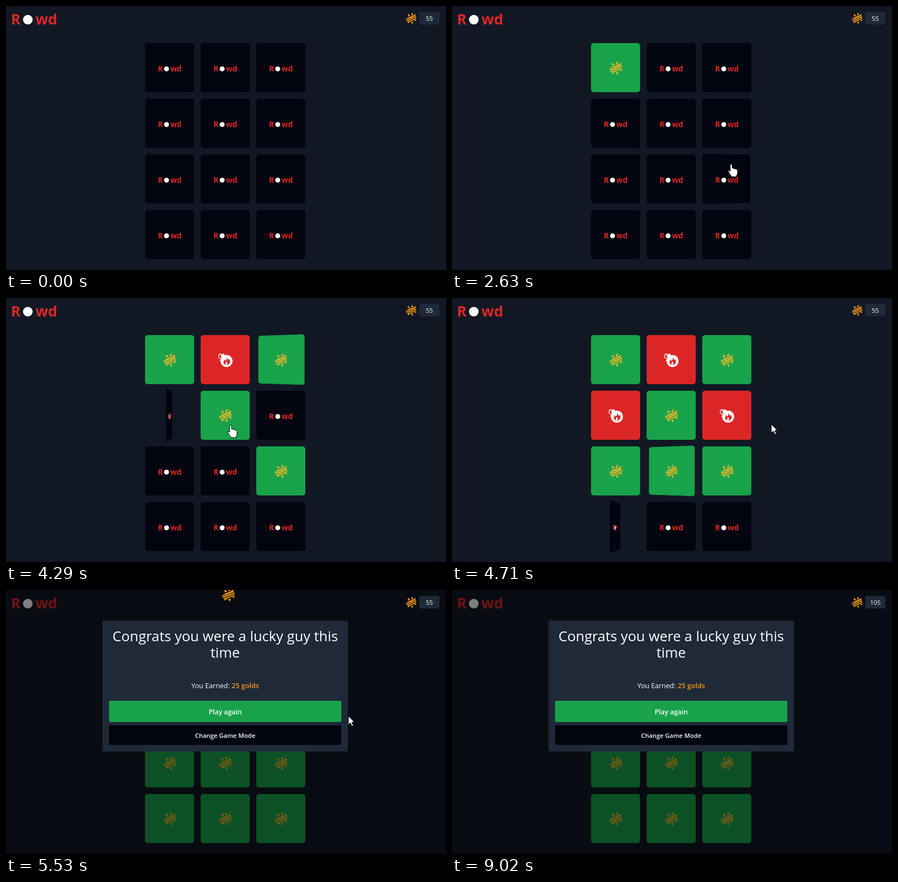
These frames come from a looping animation (807 px wide and 484 px high, 9.42 s). An HTML page:

```html
<!DOCTYPE html>
<html lang="en">
<head>
<meta charset="utf-8">
<title>Card game</title>
<style>
  html, body { margin: 0; width: 100%; height: 100%; overflow: hidden; background: #111824; }
  body { position: relative; font-family: "Open Sans", "Noto Sans", sans-serif; }
  svg { display: block; }
  .layer { position: absolute; left: 0; top: 0; width: 807px; height: 484px; }
  .slot { position: absolute; width: 90px; height: 90px; perspective: 500px; }
  .card { width: 100%; height: 100%; transform-style: preserve-3d; }
  .face { position: absolute; inset: 0; border-radius: 5px; overflow: hidden; backface-visibility: hidden; }
  .front { background: #02050f; }
  .back { transform: rotateY(180deg); color: #ebb62c; }
  .back.gold { background: #18a34a; }
  .back.blast { background: #dc2626; }
  .logo { font-weight: 700; font-size: 27px; fill: #dc2626; }
  .mid { text-anchor: middle; fill: #fff; }
</style>
</head>
<body>
<svg class="layer" viewBox="0 0 807 484">
  <defs>
    <g id="logo" class="logo">
      <text x="9" y="34">R</text>
      <circle cx="40" cy="25" r="8.8" fill="#fff"/>
      <text x="54" y="34">wd</text>
    </g>
    <g id="gold" fill="currentColor">
      <path d="M-7-10L-2-6L-7-4ZM3-13L4-7.5L-1-6ZM9.5-10L9.5-5L6-7ZM12.5 5L8 2.5L7.5 6ZM3 13L-.5 8.5L4.5 7ZM-7 11L-7.5 6.5L-3 8.5Z"/>
      <path d="M-9-.8L7-7.2L10-5.2L-5.5 1Z"/>
      <path d="M-12 2.2L-10 .2L-5.6 2.3L10.6-4.2L11.6-2L-5 4.8Z"/>
      <path d="M-11.5 3.8L-5 6.3L12-.6L11.5 1.6L-4.6 8.4L-10.5 5.8Z"/>
    </g>
    <g id="blast">
      <circle cx="2" cy="2" r="11" fill="#fff"/>
      <path d="M-9-8L-4-12L0-8L-6-2Z" fill="#fff"/>
      <path d="M-7-9Q-10-13-12-9T-10-3T-10 2" fill="none" stroke="#fff" stroke-width="1.3"/>
      <path d="M3-6Q3-2 6 1L7-2Q10 3 7 7Q5 10 1 9.5Q-4 8-3.5 3L-2-1L0 2Q3-1 3-6Z" fill="#dc2626"/>
      <path d="M2 3Q5 6 3 9H0Q-1 6 2 3Z" fill="#fff"/>
    </g>
  </defs>
  <use href="#logo"/>
</svg>
<div id="board"></div>
<svg class="layer" viewBox="0 0 807 484">
  <g id="modal">
    <rect width="807" height="484" fill="#000" opacity=".5"/>
    <rect x="177" y="56" width="450" height="240" rx="3" fill="#1f2937"/>
    <g class="mid" font-size="25.8">
      <text x="402" y="94">Congrats you were a lucky guy this</text>
      <text x="402" y="123.5">time</text>
    </g>
    <text class="mid" x="402" y="179.5" font-size="12.7">You Earned: <tspan font-weight="600" fill="#f0981b">25 golds</tspan></text>
    <rect x="189" y="203" width="426" height="39" rx="3" fill="#18a34a"/>
    <rect x="189" y="248" width="426" height="36" rx="3" fill="#02050f"/>
    <g class="mid" font-weight="600">
      <text x="402" y="227.5" font-size="12.4">Play again</text>
      <text x="402" y="270.5" font-size="11.4">Change Game Mode</text>
    </g>
  </g>
  <g color="#f59a18">
    <use href="#gold" transform="translate(743 22.5) scale(.83)"/>
    <use id="coin" href="#gold"/>
  </g>
  <rect x="758" y="11" width="37" height="23" rx="3" fill="#1f2937"/>
  <text id="score" class="mid" x="776.5" y="26.7" font-size="11.5" font-weight="500">55</text>
  <g id="cursor" fill="#fff" stroke="#000" stroke-width="1" stroke-linejoin="round">
    <path id="arrow" d="M0 0V16L3.8 12.6L6.4 18.8L9 17.7L6.4 11.6H11Z"/>
    <path id="hand" d="M-1.8 1.8Q-1.5 0 0 0T1.8 1.8V7.2Q4.4 6.4 5 8.4Q7.5 7.4 8.3 9.3Q11.6 8.6 11.8 11.5V16Q11.6 19 10 20.5V23H0V21Q-2 19.5-3 17L-5.2 13.3Q-5.6 10.6-3.4 11.4L-1.8 13.2Z"/>
  </g>
</svg>
<script>
const LOOP = 9420, FLIP = 315;
const LOSING = [1, 3, 5];
const PICKS = { 0: 1400, 8: 2605, 4: 3440 };
const REVEAL = 3993, STAGGER = 106;
const WIN = 5500, LAND = 6500;
const $ = id => document.getElementById(id);

// Cursor tip: time, x, y
const TRACK = [
  [70, 752, 472], [200, 742, 425], [340, 716, 362], [480, 672, 305], [620, 590, 266],
  [760, 500, 232], [970, 394, 179], [1040, 386, 173], [1330, 312, 118], [1640, 312, 118],
  [1930, 368, 168], [2200, 450, 240], [2500, 512, 290], [2930, 512, 290], [3260, 412, 233],
  [4360, 412, 233], [4850, 628, 231], [6150, 628, 231], [6500, 655, 240], [6800, 725, 257],
  [7080, 790, 274]
];

const clamp = v => Math.max(0, Math.min(1, v));

// cubic-bezier(.25, .1, .25, 1)
function ease(x) {
  if (x <= 0 || x >= 1) return clamp(x);
  const curve = (u, a, b) => 3 * a * u * (1 - u) ** 2 + 3 * b * u * u * (1 - u) + u ** 3;
  let lo = 0, hi = 1;
  for (let i = 0; i < 24; i++) {
    const m = (lo + hi) / 2;
    if (curve(m, .25, .25) < x) lo = m; else hi = m;
  }
  return curve(lo, .1, 1);
}

const same = (a, b) => a[1] === b[1] && a[2] === b[2];

function slope(i, k) {
  const p = TRACK[i - 1], c = TRACK[i], n = TRACK[i + 1];
  if (!p || !n || same(p, c) || same(c, n)) return 0;
  return (n[k] - p[k]) / (n[0] - p[0]);
}

function cursorAt(t) {
  const i = TRACK.findIndex(p => p[0] > t) - 1;
  if (i < 0) return null;
  const a = TRACK[i], b = TRACK[i + 1], d = b[0] - a[0], u = (t - a[0]) / d;
  return [1, 2].map(k =>
    a[k] * (1 + 2 * u) * (1 - u) ** 2 + b[k] * u * u * (3 - 2 * u) +
    d * u * (1 - u) * (slope(i, k) * (1 - u) - slope(i + 1, k) * u));
}

let order = 0;
const cards = Array.from({ length: 12 }, (_, i) => {
  const x = 255 + 102 * (i % 3), y = 68 + 102 * Math.floor(i / 3);
  const kind = LOSING.includes(i) ? 'blast' : 'gold';
  const start = PICKS[i] ?? REVEAL + STAGGER * order++;
  const slot = document.createElement('div');
  slot.className = 'slot';
  slot.style.cssText = `left:${x}px;top:${y}px`;
  slot.innerHTML = `<div class="card">
    <div class="face front"><svg width="90" height="90"><use href="#logo" transform="translate(19 34.5) scale(.51)"/></svg></div>
    <div class="face back ${kind}"><svg width="90" height="90"><use href="#${kind}" x="45.5" y="45.5"/></svg></div>
  </div>`;
  $('board').append(slot);
  return { x, y, start, el: slot.firstElementChild };
});

const show = (el, on) => { el.style.display = on ? '' : 'none'; };

function drawCursor(t) {
  const p = cursorAt(t);
  show($('cursor'), p);
  if (!p) return;
  const [x, y] = p;
  const over = t < WIN && cards.some(c => x >= c.x && x <= c.x + 90 && y >= c.y && y <= c.y + 90);
  show($('hand'), over);
  show($('arrow'), !over);
  $('cursor').setAttribute('transform', `translate(${x} ${y})`);
}

function drawCoin(t) {
  show($('coin'), t >= WIN && t < LAND);
  const p = ease((t - WIN) / (LAND - WIN));
  const x = 402 + 341 * p, y = 8 + 14.5 * p + 90 * Math.sin(Math.PI * p) ** 2;
  $('coin').setAttribute('transform', `translate(${x} ${y}) scale(${1 - .17 * p})`);
}

function frame(now) {
  const t = now % LOOP;
  for (const c of cards)
    c.el.style.transform = `rotateY(${180 * ease((t - c.start) / FLIP)}deg)`;
  show($('modal'), t >= WIN);
  drawCoin(t);
  $('score').textContent = 55 + Math.floor(50 * clamp((t - LAND - 15) / 2500));
  drawCursor(t);
}

const began = performance.now();
function tick() {
  frame(performance.now() - began);
  requestAnimationFrame(tick);
}
tick();
</script>
</body>
</html>
```
